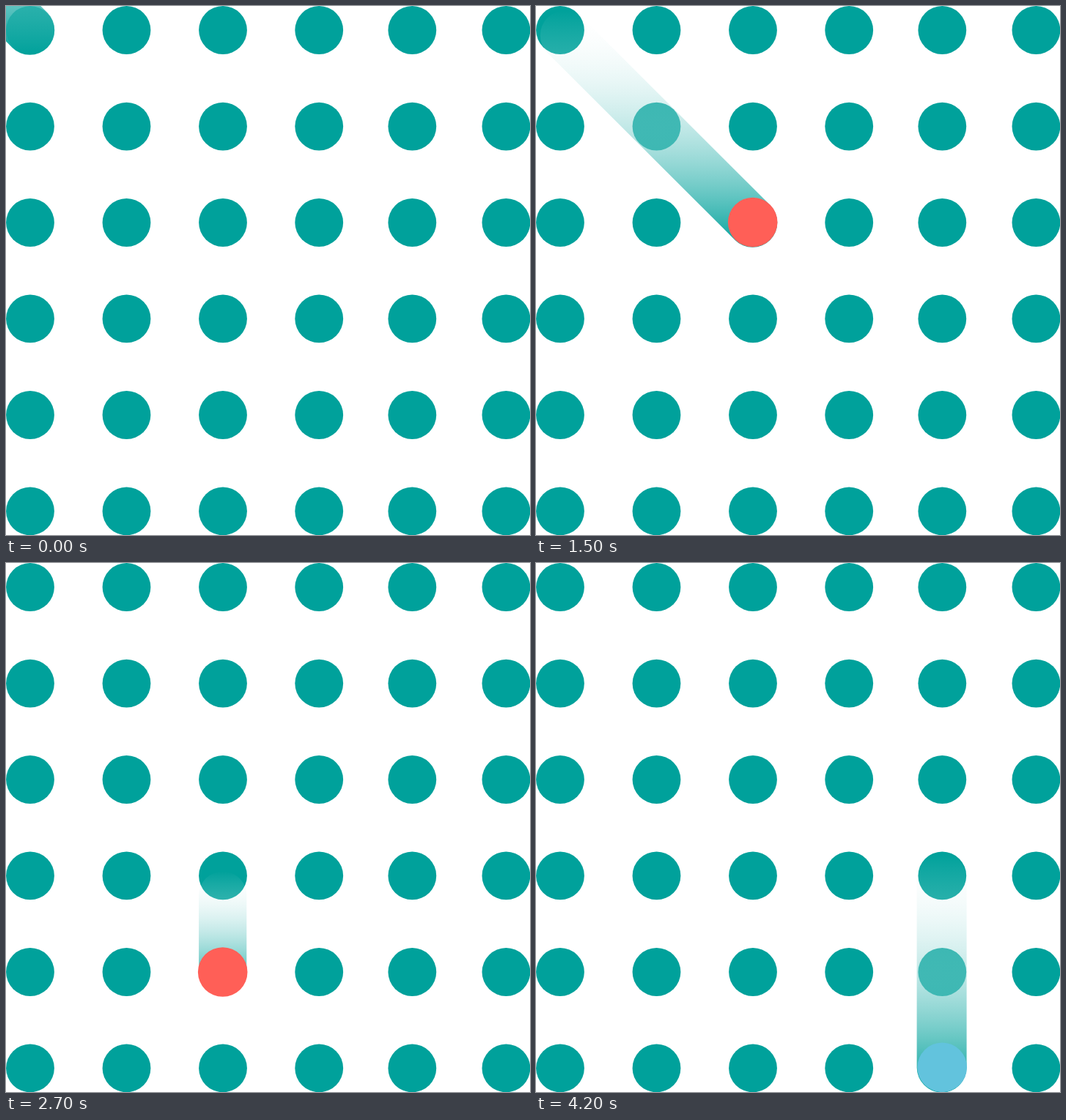
Write an HTML page that moves like this. It is 715 px wide and 723 px high and loops after 4700 ms.

```html
<!DOCTYPE html>
<html lang="en">
<head>
<meta charset="utf-8">
<title>Dot grid</title>
<style>
  html, body { margin: 0; width: 100%; height: 100%; overflow: hidden; background: #fff; }
  svg { display: block; width: 715px; height: 723px; }
</style>
</head>
<body>
<svg viewBox="0 0 715 723">
  <defs>
    <linearGradient id="fade" gradientUnits="userSpaceOnUse" x1="0" x2="0">
      <stop offset="0" stop-color="#fff" stop-opacity="0"/>
      <stop offset="1" stop-color="#00a19b"/>
    </linearGradient>
  </defs>
  <g id="grid" fill="#00a19b"></g>
  <path id="trail" fill="url(#fade)"/>
  <circle id="marker" r="33.8"/>
</svg>
<script>
const STEP = 100, TICKS = 47;
const COLS = [33, 164.5, 296, 427.2, 554.3, 682.4];
const ROWS = [33, 164.6, 296, 427.4, 559, 690.4];
const CORAL = '#ff5f57', BLUE = '#62c3dd';
const $ = id => document.getElementById(id);
const setAll = (el, attrs) => {
  for (const name in attrs) el.setAttribute(name, attrs[name]);
};

// Diagonal run: speeds up, with one held step on the way.
function diagonalHead(k) {
  const n = k > 10 ? k - 1 : k;
  return Math.min(296, 33 + 11 * n + 0.765 * n * n);
}

const pick = list => k => list[Math.min(k, list.length - 1)];

// stop: tick within the run at which the marker lands
const RUNS = [
  { start: 0, stop: 15, r: 33.8, dx: 256, dy: 256, head: diagonalHead,
    x: y => y - 0.5, shift: () => 0, mark: [295.7, 295.6, CORAL] },
  { start: 20, stop: 7, r: 32.6, dx: 0, dy: 105,
    head: pick([300, 365, 420, 462, 491.7, 506, 527, 559]),
    x: () => 295.7, shift: () => 0, mark: [295.7, 559, CORAL] },
  { start: 32, stop: 10, r: 34, dx: 0, dy: 258,
    head: pick([432, 480, 520, 555, 584, 609, 622, 633, 633, 661, 689.5]),
    x: y => 553.6 + 1.5 * Math.sin(Math.PI * (y - 432) / 258),
    shift: k => Math.max(0, 55 - 18 * k), mark: [554.2, 689.3, BLUE] }
];

function capsule(x, y, { r, dx, dy }) {
  const len = Math.hypot(dx, dy);
  const nx = -dy / len * r, ny = dx / len * r;
  const tx = x - dx, ty = y - dy;
  return `M${tx + nx} ${ty + ny}A${r} ${r} 0 0 1 ${tx - nx} ${ty - ny}` +
    `L${x - nx} ${y - ny}A${r} ${r} 0 0 1 ${x + nx} ${y + ny}Z`;
}

function draw(tick) {
  const run = RUNS.filter(item => item.start <= tick).pop();
  const k = tick - run.start;
  const y = run.head(k), x = run.x(y), shift = run.shift(k);
  setAll($('fade'), { y1: y - run.dy - run.r + shift, y2: y + run.r + shift });
  setAll($('trail'), { d: capsule(x, y, run) });
  const [cx, cy, fill] = run.mark;
  setAll($('marker'), { cx, cy, fill, visibility: k >= run.stop ? 'visible' : 'hidden' });
}

for (const cy of ROWS) for (const cx of COLS) {
  const dot = document.createElementNS('http://www.w3.org/2000/svg', 'circle');
  setAll(dot, { cx, cy, r: 32.9 });
  $('grid').append(dot);
}

const begin = performance.now();
function frame() {
  draw(Math.floor((performance.now() - begin) / STEP) % TICKS);
  requestAnimationFrame(frame);
}
frame();
</script>
</body>
</html>
```
